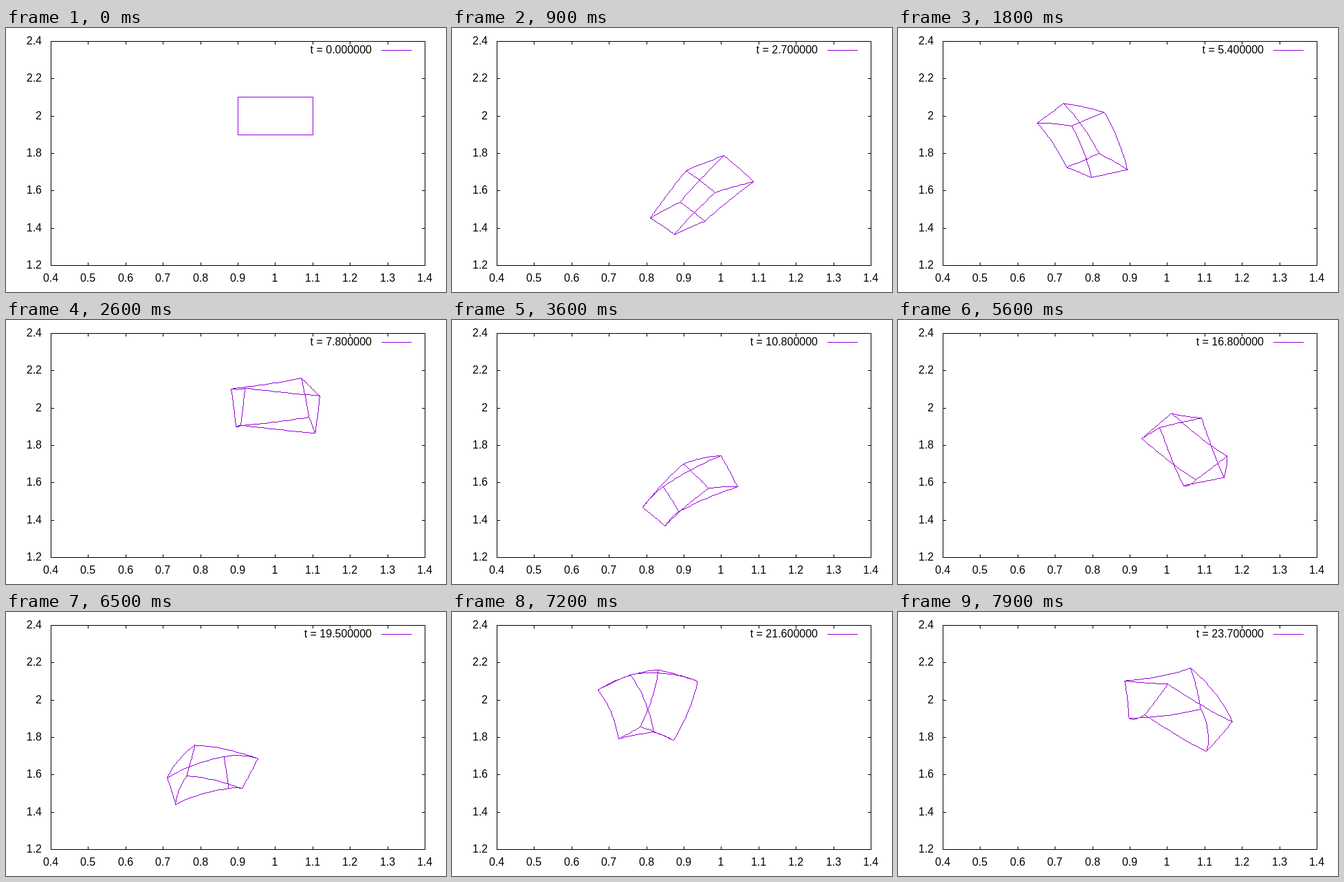
Recreate the animation shown at these times as an HTML page with a canvas. Size 640x384 px, loop 8 s.

```html
<!DOCTYPE html>
<html>
<head>
<meta charset="utf-8">
<style>
  html, body { margin: 0; width: 100%; height: 100%; overflow: hidden; background: #fff; }
  canvas { display: block; }
</style>
</head>
<body>
<canvas id="plot" width="640" height="384"></canvas>
<script>
const ctx = document.getElementById('plot').getContext('2d');
const LEFT = 65, RIGHT = 609, TOP = 19, BOTTOM = 345;
const FRAMES = 80, FRAME_MS = 100, STEP = 0.3, SEGMENTS = 20;
const PURPLE = '#9400d3';

const toX = x => LEFT + Math.round((RIGHT - LEFT) * (x - 0.4));
const toY = y => BOTTOM - Math.round((BOTTOM - TOP) * (y - 1.2) / 1.2);

// Predator x and prey y; a is the uncertain growth rate of the prey.
const flow = ([x, y, a]) => [x * (0.5 * y - 0.9), y * (a - 0.8 * x), 0];
const add = (p, v, h) => p.map((c, i) => c + h * v[i]);

function advance(p) {
  const k1 = flow(p);
  const k2 = flow(add(p, k1, STEP / 2));
  const k3 = flow(add(p, k2, STEP / 2));
  const k4 = flow(add(p, k3, STEP));
  return p.map((c, i) => c + STEP / 6 * (k1[i] + 2 * k2[i] + 2 * k3[i] + k4[i]));
}

// The twelve edges of the initial box in (x, y, a).
function boxEdges() {
  const low = [0.9, 1.9, 0.7], high = [1.1, 2.1, 0.75], edges = [];
  for (let axis = 0; axis < 3; axis++) {
    for (let corner = 0; corner < 8; corner++) {
      if (corner >> axis & 1) continue;
      const edge = [];
      for (let s = 0; s <= SEGMENTS; s++) {
        edge.push(low.map((lo, i) => {
          const f = i === axis ? s / SEGMENTS : corner >> i & 1;
          return lo * (1 - f) + high[i] * f;
        }));
      }
      edges.push(edge);
    }
  }
  return edges;
}

const states = [boxEdges()];
while (states.length < FRAMES) {
  states.push(states[states.length - 1].map(edge => edge.map(advance)));
}

// One-pixel line without antialiasing.
function line(x0, y0, x1, y1) {
  const n = Math.max(Math.abs(x1 - x0), Math.abs(y1 - y0), 1);
  for (let i = 0; i <= n; i++) {
    ctx.fillRect(Math.round(x0 + (x1 - x0) * i / n), Math.round(y0 + (y1 - y0) * i / n), 1, 1);
  }
}

function label(text, x, y, align) {
  ctx.textAlign = align;
  ctx.fillText(text, x, y);
}

function drawAxes() {
  ctx.fillStyle = '#000';
  line(LEFT, TOP, RIGHT, TOP);
  line(LEFT, BOTTOM, RIGHT, BOTTOM);
  line(LEFT, TOP, LEFT, BOTTOM);
  line(RIGHT, TOP, RIGHT, BOTTOM);
  for (let i = 4; i <= 14; i++) {
    const x = toX(i / 10);
    line(x, TOP, x, TOP + 4);
    line(x, BOTTOM - 4, x, BOTTOM);
    label(String(i / 10), x, 369, 'center');
  }
  for (let i = 12; i <= 24; i += 2) {
    const y = toY(i / 10);
    line(LEFT, y, LEFT + 4, y);
    line(RIGHT - 4, y, RIGHT, y);
    label(String(i / 10), 52, y + 5, 'right');
  }
}

function draw(frame) {
  ctx.fillStyle = '#fff';
  ctx.fillRect(0, 0, 640, 384);
  ctx.font = '16px "Liberation Sans", Arial, sans-serif';
  drawAxes();
  label('t = ' + (frame * STEP).toFixed(6), 532, 37, 'right');
  ctx.fillStyle = PURPLE;
  line(546, 32, 589, 32);
  for (const edge of states[frame]) {
    const pts = edge.map(([x, y]) => [toX(x), toY(y)]);
    for (let i = 1; i < pts.length; i++) line(...pts[i - 1], ...pts[i]);
  }
}

const start = performance.now();
let shown = -1;
function tick() {
  const frame = Math.floor((performance.now() - start) / FRAME_MS) % FRAMES;
  if (frame !== shown) draw(shown = frame);
  requestAnimationFrame(tick);
}
tick();
</script>
</body>
</html>
```
